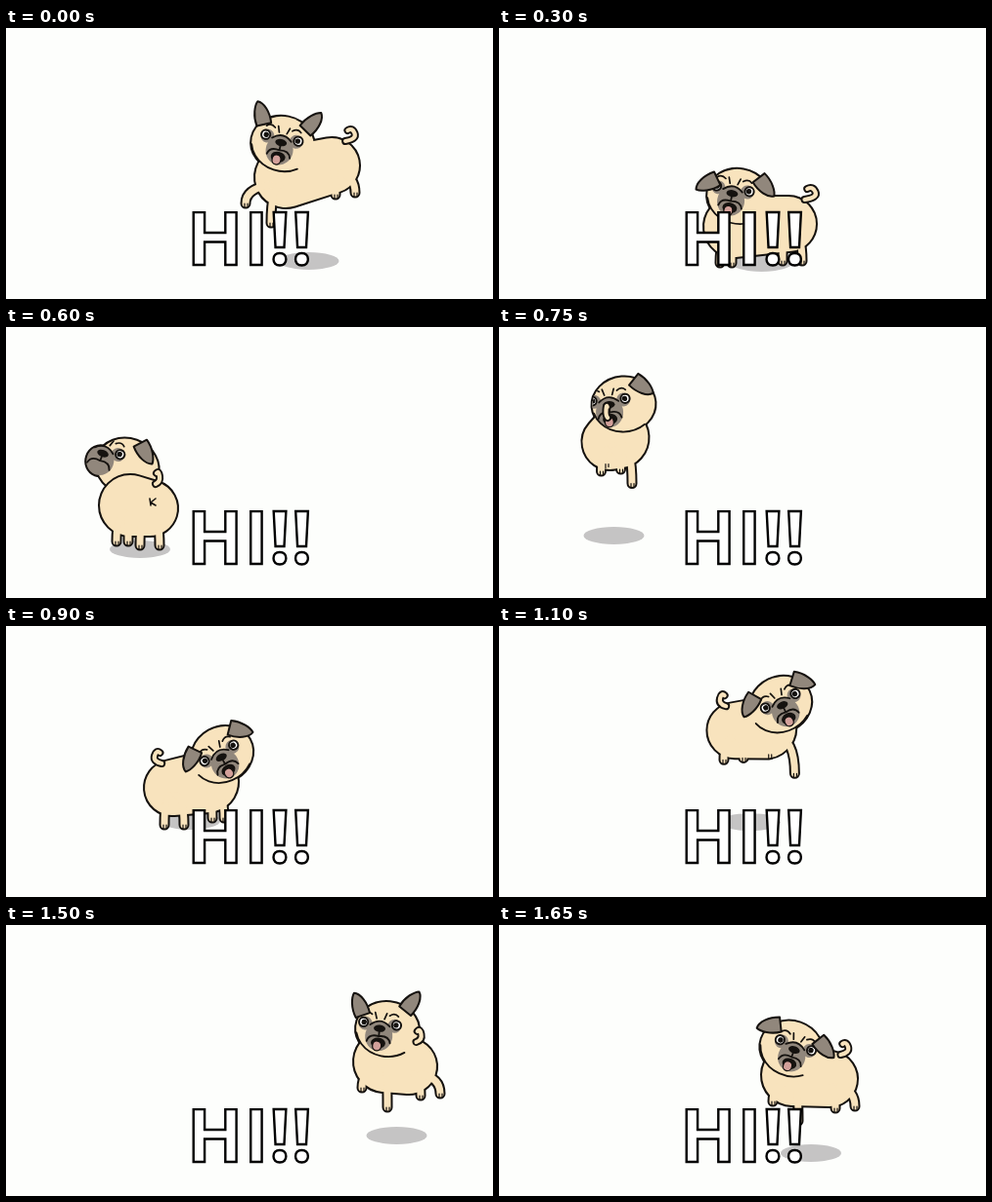
An HTML page with a canvas for the animation above (1.7 s loop, 498 by 278 pixels).

```html
<!DOCTYPE html>
<html lang="en">
<head>
<meta charset="utf-8">
<title>Hi!!</title>
<style>
html, body { margin: 0; width: 100%; height: 100%; overflow: hidden; background: #fdfefc; }
canvas { display: block; }
</style>
</head>
<body>
<canvas id="stage" width="498" height="278"></canvas>
<script>
const ctx = document.getElementById('stage').getContext('2d');
const LOOP = 1700, STEP = 50;
const INK = '#15120f', FUR = '#f8e3bd', GREY = '#91877c', SHADOW = '#c5c4c4';
const HEAD = { rx: 32, ry: 28 }, CHEST = 31, RUMP = 28;

// look: nose place on the face; stride: reach of front and hind feet;
// tuck: legs in the air; perk: ears up; drift and hop: bulge of the way to the next pose.
const poses = [
  { time: 0, head: [283, 119], roll: 12, look: [-2, -1], chest: [286, 153], rump: [333, 141],
    stride: [-28, 14], tuck: 1, perk: 1, ground: 239, drift: 0, hop: 22 },
  { time: 300, head: [245, 173], roll: 10, look: [-7, -2], chest: [241, 204], rump: [296, 201],
    stride: [-9, 4], tuck: 0, perk: 0, ground: 241, drift: 40, hop: 66 },
  { time: 600, head: [124, 143], roll: 20, look: [-28, -4], chest: [127, 183], rump: [147, 186],
    stride: [-8, 0], tuck: 0, perk: 0, ground: 228, drift: -45, hop: 58 },
  { time: 900, head: [221, 132], roll: -29, look: [-2, 2], chest: [206, 160], rump: [170, 166],
    stride: [11, 2], tuck: 0, perk: 0, ground: 200, drift: 0, hop: 58 },
  { time: 1250, head: [338, 141], roll: -23, look: [4, 1], chest: [322, 162], rump: [295, 162],
    stride: [22, -4], tuck: 0, perk: 0, ground: 202, drift: 0, hop: 36 },
  { time: 1500, head: [390, 107], roll: 6, look: [-8, 0], chest: [387, 140], rump: [412, 145],
    stride: [-10, 22], tuck: 1, perk: 1, ground: 216, drift: 0, hop: -20 },
  { time: 1650, head: [299, 127], roll: 19, look: [3, 0], chest: [300, 154], rump: [338, 158],
    stride: [-7, 16], tuck: 1, perk: 0.1, ground: 234, drift: 0, hop: 0 }
];

const mix = (a, b, p) => Array.isArray(a) ? a.map((v, i) => mix(v, b[i], p)) : a + (b - a) * p;

function poseAt(time) {
  const i = poses.findLastIndex(p => p.time <= time);
  const from = poses[i], to = poses[(i + 1) % poses.length];
  const p = (time - from.time) / ((to.time || LOOP) - from.time);
  const bulge = Math.sin(Math.PI * p), dog = {};
  for (const part in from) dog[part] = mix(from[part], to[part], p);
  for (const part of ['head', 'chest', 'rump']) {
    dog[part][0] += from.drift * bulge;
    dog[part][1] -= from.hop * bulge;
  }
  if (from.hop > 30) dog.tuck = Math.max(dog.tuck, bulge);
  dog.turn = dog.roll * Math.PI / 180;
  dog.behind = dog.look[0] < -20;
  return dog;
}

function oval(x, y, rx, ry = rx, turn = 0, start = 0, end = 2 * Math.PI) {
  const path = new Path2D();
  path.ellipse(x, y, rx, ry, turn, start, end);
  return path;
}

function line(path, width, color = INK) {
  ctx.strokeStyle = color;
  ctx.lineWidth = width;
  ctx.stroke(path);
}

function fill(path, color, outline = 0) {
  ctx.fillStyle = color;
  ctx.fill(path);
  if (outline) line(path, outline);
}

// Inks every shape first, so that overlapping shapes share one outline.
function merged(shapes) {
  for (const { path, width = 0 } of shapes) line(path, width + 4);
  for (const { path, width, color = FUR } of shapes) {
    if (width) line(path, width, color);
    else fill(path, color);
  }
}

// Two circles wrapped by their common tangents.
function trunk({ chest: [cx, cy], rump: [rx, ry] }) {
  const angle = Math.atan2(ry - cy, rx - cx);
  const spread = Math.acos((CHEST - RUMP) / Math.hypot(rx - cx, ry - cy));
  const path = new Path2D();
  path.arc(cx, cy, CHEST, angle + spread, angle - spread);
  path.arc(rx, ry, RUMP, angle - spread, angle + spread);
  path.closePath();
  return path;
}

function legs({ chest, rump, stride: [front, hind], tuck }) {
  const gap = 6 + 7 * tuck;
  const leg = ([x, y], dx, dy) => {
    const fx = x + dx, fy = y + dy;
    return {
      path: new Path2D(`M${x + dx * 0.4} ${y + 8}Q${fx} ${y + 12} ${fx} ${fy}`), width: 7,
      toes: new Path2D(`M${fx - 1} ${fy}v4M${fx + 2} ${fy}v3`)
    };
  };
  return [
    leg(chest, front - gap, 37 - 10 * tuck), leg(chest, front + gap, 37 + 10 * tuck),
    leg(rump, hind - 10, 38 - 8 * tuck), leg(rump, hind + 10, 38 - 10 * tuck)
  ];
}

function tail({ chest, rump: [x, y] }) {
  const lean = (x - chest[0]) / 2;
  const curl = new Path2D(`M${x + lean * 0.6} ${y - 25}q${lean * 0.5} -2 ${lean * 0.4} -8t${-lean * 0.3} -3`);
  line(curl, 8);
  line(curl, 4.2, FUR);
}

function ear(side, { look, perk }) {
  const x = side * 22 + look[0] * 0.6;
  if (Math.abs(x) > 30) return;
  const y = -HEAD.ry * Math.sqrt(1 - (x / HEAD.rx) ** 2);
  ctx.save();
  ctx.translate(x, y + 2);
  ctx.rotate(side * mix(2.25, 0.5, perk));
  fill(new Path2D('M-8 1C-9 -10 -4 -20 0 -23C6 -20 9 -9 7 2Z'), GREY, 2);
  ctx.restore();
}

function face(dog) {
  const [x, y] = dog.look;
  ctx.save();
  ctx.translate(...dog.head);
  ctx.rotate(dog.turn);
  if (!dog.behind) line(oval(0, 0, HEAD.rx, HEAD.ry, 0, 0.9, 2.9), 1.8);
  ctx.save();
  ctx.clip(oval(0, 0, HEAD.rx, HEAD.ry));
  for (const side of [-1, 1]) {
    const ex = x + side * 17, ey = y - 5;
    fill(oval(ex - side * 2, ey + 1, 7), GREY);
    fill(oval(ex, ey, 4.6), '#fff', 2);
    fill(oval(ex - side * 0.6, ey, 2.7), INK);
    line(new Path2D(`M${x + side * 4} ${y - 10}l${side * 2} -6M${x + side * 9} ${y - 14}q${side * 5} -4 ${side * 9} 0`), 1.7);
  }
  ctx.restore();
  ctx.translate(x, y);
  fill(oval(0, 0, 6, 3.6), INK);
  line(new Path2D('M-10 -3q10 -9 20 0M0 3v5M-12 14q2 -8 12 -6q10 -2 12 6'), 1.8);
  if (!dog.behind) {
    fill(oval(0, 15, 7.5, 5.5), INK);
    fill(oval(-1, 18, 4.5, 5), '#d3a09a', 1.3);
  }
  ctx.restore();

  ctx.save();
  ctx.translate(...dog.head);
  ctx.rotate(dog.turn);
  ear(-1, dog);
  ear(1, dog);
  ctx.restore();
}

function drawDog(dog) {
  const [x, y] = dog.head, [lx, ly] = dog.look;
  const cos = Math.cos(dog.turn), sin = Math.sin(dog.turn), my = ly + 8;
  const skull = [
    { path: oval(x, y, HEAD.rx, HEAD.ry, dog.turn) },
    { path: oval(x + lx * cos - my * sin, y + lx * sin + my * cos, 14, 15, dog.turn), color: GREY }
  ];
  const limbs = legs(dog), body = [{ path: trunk(dog) }, ...limbs];
  if (dog.behind) {
    merged(skull);
    face(dog);
    merged(body);
    const [rx, ry] = dog.rump;
    line(new Path2D(`M${rx} ${ry - 10}l1 7m5 -7l-5 4 5 3`), 1.6);
  } else {
    merged([...body, ...skull]);
    face(dog);
  }
  for (const { toes } of limbs) line(toes, 1.2);
  tail(dog);
}

function drawText() {
  ctx.font = 'bold 75px "Open Sans", sans-serif';
  ctx.letterSpacing = '1px';
  ctx.lineJoin = 'miter';
  ctx.fillStyle = '#fff';
  ctx.fillText('HI!!', 185, 242.5);
  ctx.strokeStyle = '#000';
  ctx.lineWidth = 2.4;
  ctx.strokeText('HI!!', 185, 242.5);
}

function draw() {
  const time = Math.floor(performance.now() % LOOP / STEP) * STEP;
  const dog = poseAt(time);
  ctx.fillStyle = '#fdfefc';
  ctx.fillRect(0, 0, 498, 278);
  ctx.lineCap = ctx.lineJoin = 'round';
  fill(oval((dog.chest[0] + dog.rump[0]) / 2, dog.ground, 31, 9), SHADOW);
  drawDog(dog);
  drawText();
  requestAnimationFrame(draw);
}
draw();
</script>
</body>
</html>
```
